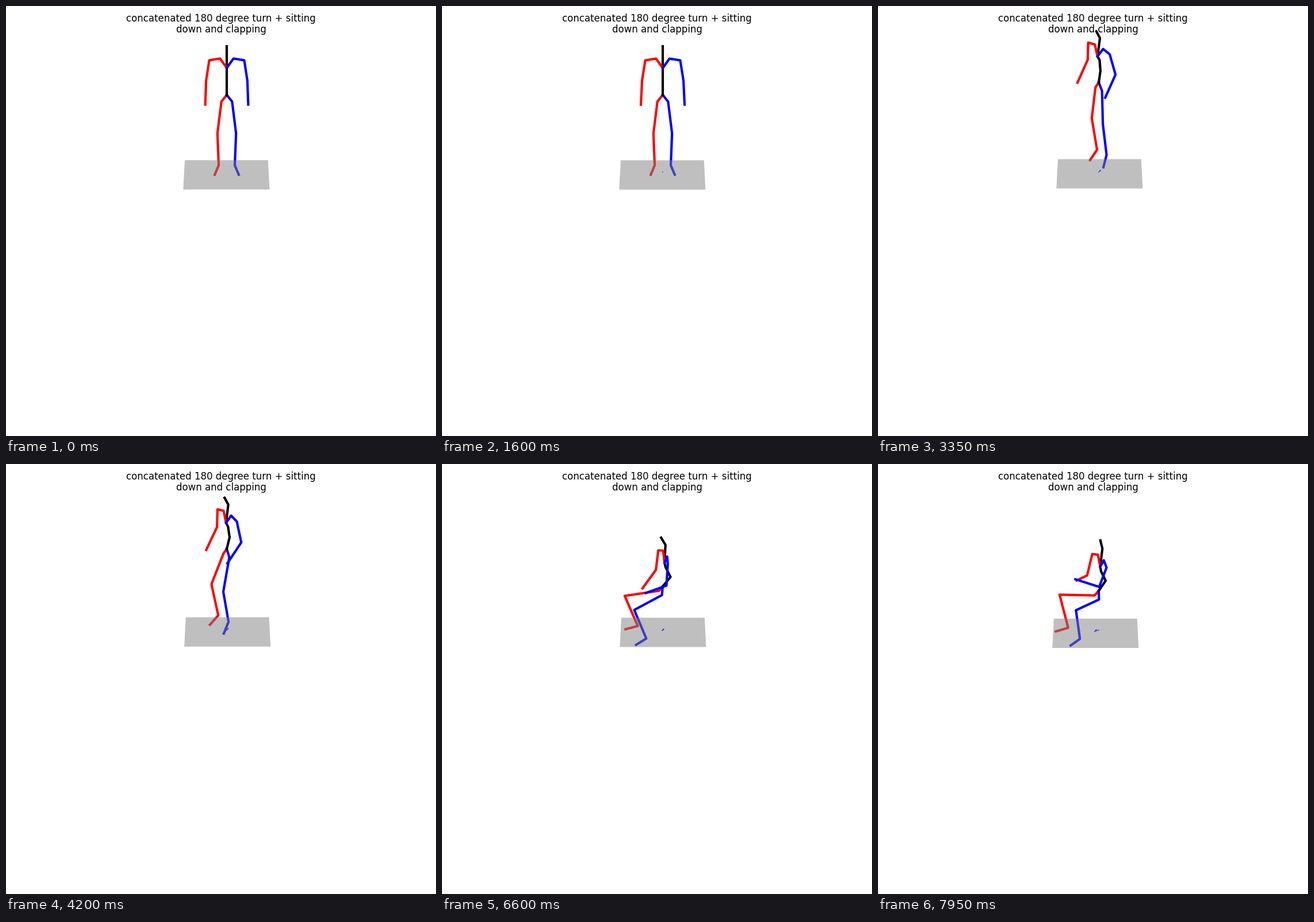
A matplotlib script that plays this animation: 748 by 748 pixels, repeating every 8 s.

```python
import numpy as np
import matplotlib.pyplot as plt
from matplotlib.animation import FuncAnimation
from matplotlib.patches import Polygon

SIZE, DPI = 748, 100
STEP, COUNT = 50, 160
TILT = np.radians(25)  # camera looks down on the figure
CENTER = 384
HOME = np.array([CENTER, 288.9])
FLOOR = np.array([(311, 268.2), (455.8, 268.2), (458.4, 319.2), (308.3, 319.2)])

# bone lengths in pixels
SPINE = np.array([21.4, 21.5, 9.4, 34, 17])
LEG = np.array([15.8, 61, 63.5, 22.3])   # hip, thigh, shin, foot
ARM = np.array([21.5, 19, 39, 44])       # collar, shoulder, upper arm, forearm


def pose(spine, leg, arm, leg_out, arm_out):
    """Forward swing of each bone from straight down, then sideways spread."""
    return np.array(spine + leg + arm + leg_out + arm_out, float)


stand = pose([198, 185, 151, 180, 140], [0, 1, -4, 65], [180, 0, 1, 7],
             [36, 6.5, -2, 18], [33, 80, 8, 2])
turned = pose([190, 175, 151, 189, 153], [0, 3, -9, 31], [190, 0, -9, 31],
              [36, 6, -2, 14], [33, 80, 13, 0])
seated = pose([221, 156, 167, 183, 152], [19, 78, -21, 72], [184, 30, 5, 56],
              [36, 20, -3, 17], [36, 66, 5, -32])
clap = pose([218, 156, 170, 187, 167], [17, 91, -11, 74], [184, 25, 18, 105],
            [36, 25, -9, 17], [36, 70, -7, -40])


def ease(ms, start, end, power=1):
    t = np.clip((ms - start) / (end - start), 0, 1) ** power
    return t * t * (3 - 2 * t)


def phases(ms):
    """How far along: settling, turning, sitting down, raising the hands."""
    return (ease(ms, 0, 2350, 4), ease(ms, 2350, 3350),
            ease(ms, 3350, 5200, 1.6), ease(ms, 6600, 7950))


def drift(ms):
    settle, turn, sit, lift = phases(ms)
    return np.array([-0.9 * settle + 2.9 * turn - sit - 6.1 * lift,
                     1.6 * settle - 3.4 * turn + sit + 1.6 * lift])


def chain(start, bones, swing, spread, side, yaw):
    """Screen points of a limb whose bones follow one another from start."""
    p, q = np.radians(swing), np.radians(spread)
    down = bones * np.cos(p) * np.cos(q)
    ahead = bones * np.sin(p) * np.cos(q)
    left = side * bones * np.sin(q)
    x = left * np.cos(yaw) - ahead * np.sin(yaw)
    depth = left * np.sin(yaw) + ahead * np.cos(yaw)
    y = down * np.cos(TILT) + depth * np.sin(TILT)
    return np.vstack([start, start + np.cumsum(np.column_stack([x, y]), axis=0)])


def skeleton(ms):
    settle, turn, sit, lift = phases(ms)
    angles = (stand + turn * (turned - stand) + sit * (seated - turned)
              + lift * (clap - seated))
    spine, leg, arm, leg_out, arm_out = np.split(angles, [5, 9, 13, 17])
    sway = settle * (1 - turn)
    spine = spine - 4 * sway
    arm_out = arm_out + sway * np.array([0, 0, 2, 5])
    yaw = np.radians(52 * turn + 22 * sit - 8 * lift)
    sink = 15.5 * np.clip((ms - 5200) / 2750, 0, 1)
    pelvis = np.array([CENTER, 154.7 - 21.7 * turn + 72 * sit + sink])

    back = chain(pelvis, SPINE, spine, 0, 0, yaw)
    legs = [chain(pelvis, LEG, leg, leg_out, side, yaw) for side in (-1, 1)]
    arms = [chain(back[3], ARM, arm, arm_out, side, yaw) for side in (-1, 1)]
    return legs + [back] + arms


PATH = np.array([drift(i * STEP) for i in range(COUNT)])

fig = plt.figure(figsize=(SIZE / DPI, SIZE / DPI), dpi=DPI, facecolor="white")
fig.suptitle("concatenated 180 degree turn + sitting\ndown and clapping",
             y=0.982, fontsize=12, linespacing=1.07)
ax = fig.add_axes([0, 0, 1, 1])
ax.set_xlim(0, SIZE)
ax.set_ylim(SIZE, 0)
ax.axis("off")

limbs = [ax.plot([], [], color=c, lw=3)[0]
         for c in ("red", "blue", "black", "red", "blue")]
trail, = ax.plot([], [], color="blue", lw=1)
floor = ax.add_patch(Polygon(FLOOR, facecolor=(0.5, 0.5, 0.5, 0.5), lw=0, zorder=5))


def draw(i):
    for line, points in zip(limbs, skeleton(i * STEP)):
        line.set_data(*points.T)
    floor.set_xy(FLOOR + PATH[i])
    trail.set_data(*(HOME + PATH[i] - PATH[:i + 1]).T)
    return limbs + [trail, floor]


anim = FuncAnimation(fig, draw, frames=COUNT, interval=STEP, repeat=True,
                     repeat_delay=0, init_func=lambda: draw(0))
plt.show()
```
